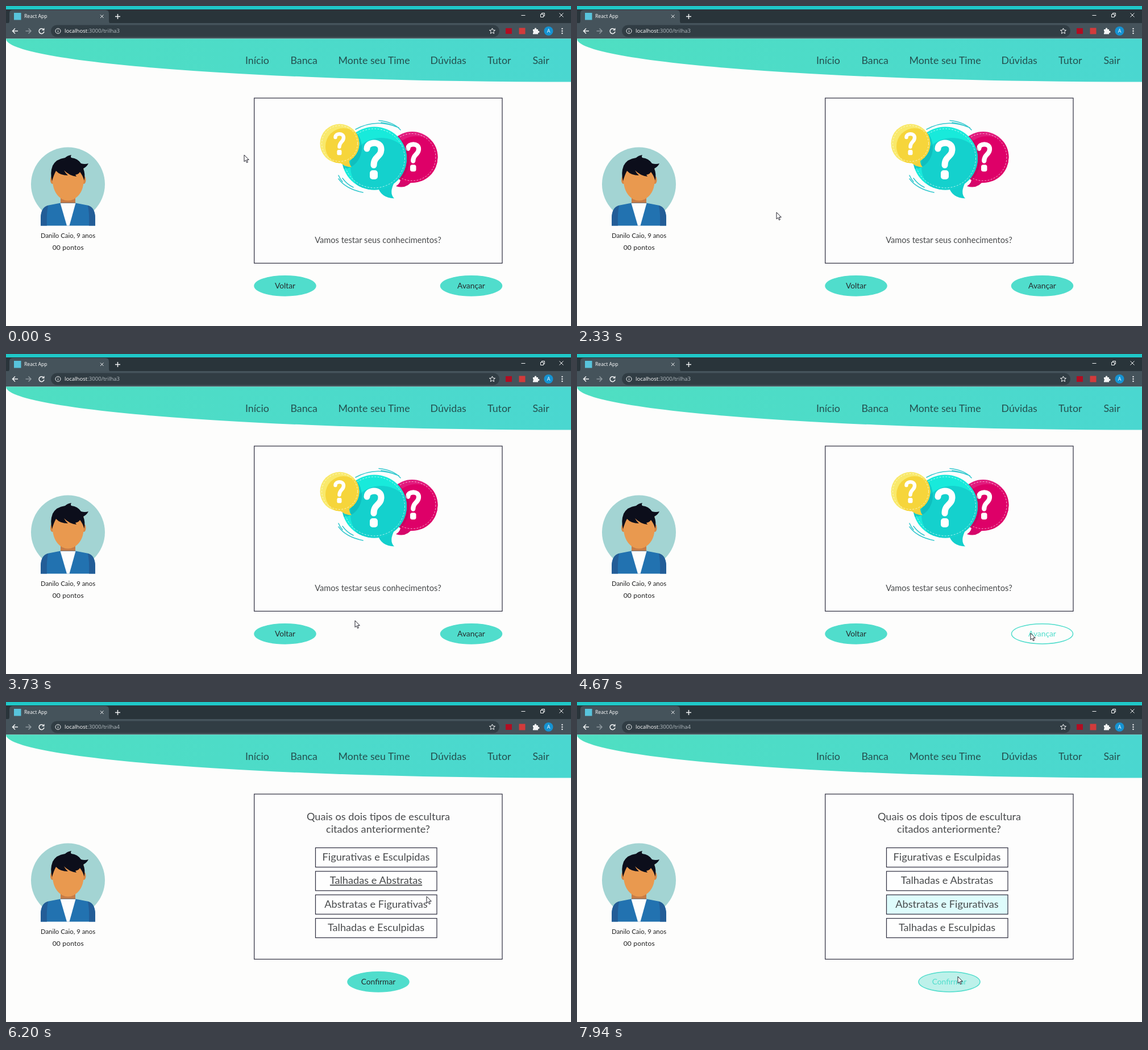
An HTML page for the animation above (8000 ms loop, 994 by 563 pixels).

```html
<!DOCTYPE html>
<html lang="pt-BR">
<head>
<meta charset="utf-8">
<title>Trilha</title>
<style>
  html, body { margin: 0; width: 100%; height: 100%; overflow: hidden; background: #fdfdfc; }
  svg { display: block; width: 994px; height: 563px; }
  text { font-family: Lato, "Open Sans", sans-serif; fill: #484a4c; }
  .ui text { font-family: "Open Sans", "Noto Sans", sans-serif; fill: #fff; }
  .ui .line { fill: none; stroke: #f2f4f5; stroke-width: 1.5; }
  .ui .thin { stroke-width: 1; }
  .nav text { font-size: 17.8px; fill: #24504f; }
  .mid { text-anchor: middle; }
  .user text { font-size: 11.4px; fill: #222; }
  .button text { font-size: 13.8px; }
  .question text { font-size: 18.2px; }
  .box { fill: #fefefe; stroke: #2b2b3c; stroke-width: 1.2; }
  .dash { fill: none; stroke: #fff; stroke-opacity: .65; stroke-width: 1; stroke-dasharray: 3 2.4; }
  .swoosh { fill: none; stroke: #35c9cf; stroke-width: 1.6; stroke-linecap: round; }
</style>
</head>
<body>
<svg viewBox="0 0 994 563">
  <defs>
    <linearGradient id="sea">
      <stop offset="0" stop-color="#4fdfc2"/>
      <stop offset="1" stop-color="#4ad7d0"/>
    </linearGradient>
    <g id="mark">
      <path d="M-13-19C-13-32 12-33 12-18C12-4-1-6-1 10" fill="none" stroke="#fff" stroke-width="11" stroke-linecap="round"/>
      <rect x="-8" y="19" width="14" height="16" rx="5" fill="#fff"/>
    </g>
    <clipPath id="yellowClip"><circle cx="587" cy="242" r="34.5"/></clipPath>
    <clipPath id="tealClip"><ellipse cx="648" cy="268" rx="57" ry="55.5"/></clipPath>
    <clipPath id="pinkClip"><circle cx="714.5" cy="266" r="45"/></clipPath>
  </defs>

  <rect width="994" height="563" fill="#fdfdfc"/>

  <!-- Browser window -->
  <g class="ui">
    <rect width="994" height="7" fill="#1fc8c8"/>
    <rect y="6" width="994" height="25" fill="#29343a"/>
    <rect y="30" width="994" height="27.5" fill="#45535b"/>
    <path d="M2 31Q6 31 6 26V13Q6 7 12 7H175Q181 7 181 13V26Q181 31 185 31Z" fill="#45535b"/>
    <rect x="14" y="12" width="12.5" height="12.5" fill="#58c4dc"/>
    <text x="32" y="21" font-size="8.7">React App</text>
    <path class="line thin" d="M166 15.5l5.5 5.5m0-5.5l-5.5 5.5"/>
    <path class="line" d="M192 18.5h9m-4.500-4.500v9"/>
    <path class="line thin" d="M906.500 16.500h7M940.500 14.500h5v5h-5zM942.500 14.500v-2h5v5h-2M973.500 12.500l7 7m0-7l-7 7"/>
    <path class="line" d="M21 44H11.500m4.500-4.500L11.500 44l4.500 4.500"/>
    <path class="line" style="stroke:#8d989e" d="M34.500 44H44m-4.500-4.500L44 44l-4.500 4.500"/>
    <path class="line" d="M66 41.200A4.500 4.500 0 1 0 67 45"/>
    <path d="M67.500 38.500v4.500H63z" fill="#f2f4f5"/>
    <rect x="79" y="33.500" width="789" height="21" rx="10.500" fill="#313d44"/>
    <circle class="line thin" cx="91.500" cy="44" r="4.500"/>
    <path class="line thin" d="M91.500 43.500v3M91.500 41.200v1.200"/>
    <text x="103" y="47.300" font-size="9.600">localhost<tspan fill="#b4bdc2">:3000/trilha<tspan id="step">3</tspan></tspan></text>
    <path class="line thin" d="M855.500 39l1.400 3.300 3.600.3-2.700 2.400.8 3.500-3.100-1.900-3.100 1.900.8-3.500-2.700-2.400 3.600-.3z"/>
    <rect x="879" y="39" width="11" height="10" fill="#b00d22"/>
    <rect x="902.500" y="38.500" width="11" height="11" fill="#d23b3b"/>
    <path d="M927 41h3a1.700 1.700 0 1 1 3 0h3v3a1.700 1.700 0 1 1 0 3v2.500h-9V47a1.700 1.700 0 0 0 0-3z" fill="#f2f4f5"/>
    <circle cx="954.500" cy="44" r="8" fill="#1593d2"/>
    <text class="mid" x="954.500" y="47.200" font-size="9">A</text>
    <g fill="#f2f4f5"><circle cx="978.500" cy="40" r="1.200"/><circle cx="978.500" cy="44" r="1.200"/><circle cx="978.500" cy="48" r="1.200"/></g>
  </g>

  <!-- Page header -->
  <path d="M0 57.500A994 76 0 0 0 994 133.500V57.500Z" fill="url(#sea)"/>
  <g class="nav" id="nav"></g>

  <!-- Player -->
  <g class="user">
    <circle cx="109" cy="313.500" r="65" fill="#a3d4d3"/>
    <path d="M96 330h26v19l-13 10-13-10z" fill="#c67b46"/>
    <path d="M61 386.500V374Q61 352 78 350L96 346.500H122L140 350Q157 352 157 374V386.500Z" fill="#2272b0"/>
    <path d="M61 386.500V374Q61 354 74 351Q71 366 72 386.500ZM157 386.500V374Q157 354 144 351Q147 366 146 386.500Z" fill="#235d97"/>
    <path d="M95.500 347H122.500L111.500 386.500H107Z" fill="#fdfdfd"/>
    <ellipse cx="81.500" cy="306" rx="3.500" ry="7" fill="#d98845"/>
    <ellipse cx="137" cy="306" rx="3.500" ry="7" fill="#d98845"/>
    <path d="M82 284H136.500V310Q135 331 119 340Q109 345 99 340Q84 331 82 310Z" fill="#e9994f"/>
    <path d="M81 308Q77 294 82 281Q88 269 104 267Q108 263 115 262Q113 265 115 267Q126 268 132 277Q139 279 145 277Q142 283 136 286Q140 296 137.500 307Q135 298 130 292Q128 296 122 297L124 300Q112 299 102 289Q105 295 109 298Q95 298 88 290Q84 297 81 308Z" fill="#0c0e1b"/>
    <text class="mid" x="109" y="407.500">Danilo Caio, 9 anos</text>
    <text class="mid" x="109.300" y="428.500" style="font-size:12px;letter-spacing:.2px">00 pontos</text>
  </g>

  <rect class="box" x="436.700" y="162" width="436.300" height="290.500" style="fill:#fdfdfd"/>

  <g id="intro">
    <path class="swoosh" d="M615 217Q651 197 691 214M656 201.500Q682 204 694 218M660 205Q675 207 685 212M585 304Q598 322 628 328M592 303Q600 314 611 319M585 298Q588 305 592 309"/>
    <path d="M694 299Q696 311 686 317Q705 323 716 306Z" fill="#d5066a"/>
    <circle cx="714.500" cy="266" r="45" fill="#e21a7d"/>
    <circle cx="722" cy="274" r="45" fill="#de0068" clip-path="url(#pinkClip)"/>
    <circle class="dash" cx="714.500" cy="266" r="41.500"/>
    <use href="#mark" transform="translate(717 265) scale(.75)"/>
    <ellipse cx="652" cy="270" rx="57" ry="55" fill="#900f56" opacity=".35" clip-path="url(#pinkClip)"/>
    <path d="M654 318Q660 338 683 338.500Q673 329 684 309Z" fill="#13cfcc"/>
    <ellipse cx="648" cy="268" rx="57" ry="55.500" fill="#18eadb"/>
    <ellipse cx="660" cy="283" rx="54" ry="51" fill="#14d1cd" clip-path="url(#tealClip)"/>
    <ellipse class="dash" cx="648" cy="268" rx="53.500" ry="52"/>
    <ellipse cx="593" cy="249" rx="33" ry="38" fill="#0aa6aa" opacity=".45" clip-path="url(#tealClip)"/>
    <use href="#mark" transform="translate(648 270)"/>
    <path d="M585 273Q594 283 608 283.500Q602 277 605 267Z" fill="#f4d23c"/>
    <circle cx="587" cy="242" r="34.500" fill="#f9e96b"/>
    <circle cx="594" cy="247" r="32" fill="#f6d53b" clip-path="url(#yellowClip)"/>
    <circle class="dash" cx="587" cy="242" r="31.500"/>
    <use href="#mark" transform="translate(587 242) scale(.58)"/>
    <text class="mid" x="654.500" y="417" font-size="14.600">Vamos testar seus conhecimentos?</text>
  </g>

  <g id="quiz" class="question mid">
    <text x="655" y="208">Quais os dois tipos de escultura</text>
    <text x="654.500" y="229.500">citados anteriormente?</text>
    <g id="options"></g>
  </g>

  <g id="buttons"></g>

  <path id="cursor" d="M0 0V11.800L2.700 9.300 4.500 13.600 6.400 12.800 4.600 8.600H8.300Z" fill="#fff" stroke="#22222c" stroke-width="1" stroke-linejoin="round"/>
</svg>

<script>
const LOOP = 8000;
const PAGE_AT = 4870;   // second page opens
const PICK_AT = 6600;   // third answer is chosen
const TEAL = [80, 221, 204], WHITE = [253, 253, 252], INK = [38, 44, 46];

// time, x, y of the pointer tip
const path = [
  [0, 419, 262], [1300, 422, 276], [2330, 351, 363], [3730, 614, 469],
  [4420, 798, 491], [5000, 798, 491], [5850, 735, 312], [6200, 740, 342],
  [6400, 733, 354], [6560, 733, 354], [7340, 670, 483], [LOOP, 670, 483]
];

const $ = id => document.getElementById(id);
const add = (parent, tag, attrs, text) => {
  const el = document.createElementNS("http://www.w3.org/2000/svg", tag);
  for (const key in attrs) el.setAttribute(key, attrs[key]);
  if (text) el.textContent = text;
  return parent.appendChild(el);
};
const ramp = (t, from, to) => Math.min(1, Math.max(0, (t - from) / (to - from)));
const smooth = k => k * k * (3 - 2 * k);
const mix = (a, b, k) => `rgb(${a.map((v, i) => Math.round(v + (b[i] - v) * k))})`;
const show = (el, on) => el.setAttribute("visibility", on ? "visible" : "hidden");

[["Início", 421], ["Banca", 500.5], ["Monte seu Time", 584.5],
 ["Dúvidas", 746.5], ["Tutor", 847], ["Sair", 926.5]]
  .forEach(([label, x]) => add($("nav"), "text", { x, y: 101.5 }, label));

const options = ["Figurativas e Esculpidas", "Talhadas e Abstratas",
  "Abstratas e Figurativas", "Talhadas e Esculpidas"].map((label, i) => {
  const y = 256.5 + i * 41.4;
  return {
    box: add($("options"), "rect", { class: "box", x: 544.5, y, width: 213.5, height: 34 }),
    text: add($("options"), "text", { x: 651, y: y + 22.5 }, label)
  };
});

const makeButton = (label, cx) => {
  const g = add($("buttons"), "g", { class: "button mid" });
  const oval = add(g, "ellipse", { cx, cy: 492.3, rx: 54, ry: 17.6, stroke: mix(TEAL, TEAL, 0), "stroke-width": 1.5 });
  const text = add(g, "text", { x: cx, y: 497 }, label);
  return { g, paint(hover) {
    oval.style.fill = mix(TEAL, WHITE, hover);
    text.style.fill = mix(INK, TEAL, Math.min(1, hover * 1.6));
  } };
};
const back = makeButton("Voltar", 491);
const next = makeButton("Avançar", 818.5);
const confirm = makeButton("Confirmar", 655);

function pointer(t) {
  const i = Math.max(1, path.findIndex(p => p[0] > t));
  const [t0, x0, y0] = path[i - 1], [t1, x1, y1] = path[i];
  const k = smooth(ramp(t, t0, t1));
  return [x0 + (x1 - x0) * k, y0 + (y1 - y0) * k];
}

function hovered(t) {
  if (t < 5650 || t > 6880) return -1;
  return t < 6240 ? 1 : t < 6780 ? 2 : 3;
}

function draw(t) {
  const second = t >= PAGE_AT;
  show($("intro"), !second);
  show($("quiz"), second);
  show(back.g, !second);
  show(next.g, !second);
  show(confirm.g, second);
  $("step").textContent = second ? "4" : "3";

  back.paint(0);
  next.paint(ramp(t, 4150, 4350));
  confirm.paint(ramp(t, 7200, 7400) - 0.37 * ramp(t, 7790, 7940));

  const over = hovered(t);
  options.forEach(({ box, text }, i) => {
    box.style.fill = i === 2 && t >= PICK_AT ? "#defcfc" : "#fefefe";
    text.style.textDecoration = i === over ? "underline" : "none";
  });

  $("cursor").setAttribute("transform", `translate(${pointer(t).join(" ")})`);
}

const start = performance.now();
function tick() {
  draw((performance.now() - start) % LOOP);
  requestAnimationFrame(tick);
}
tick();
</script>
</body>
</html>
```
